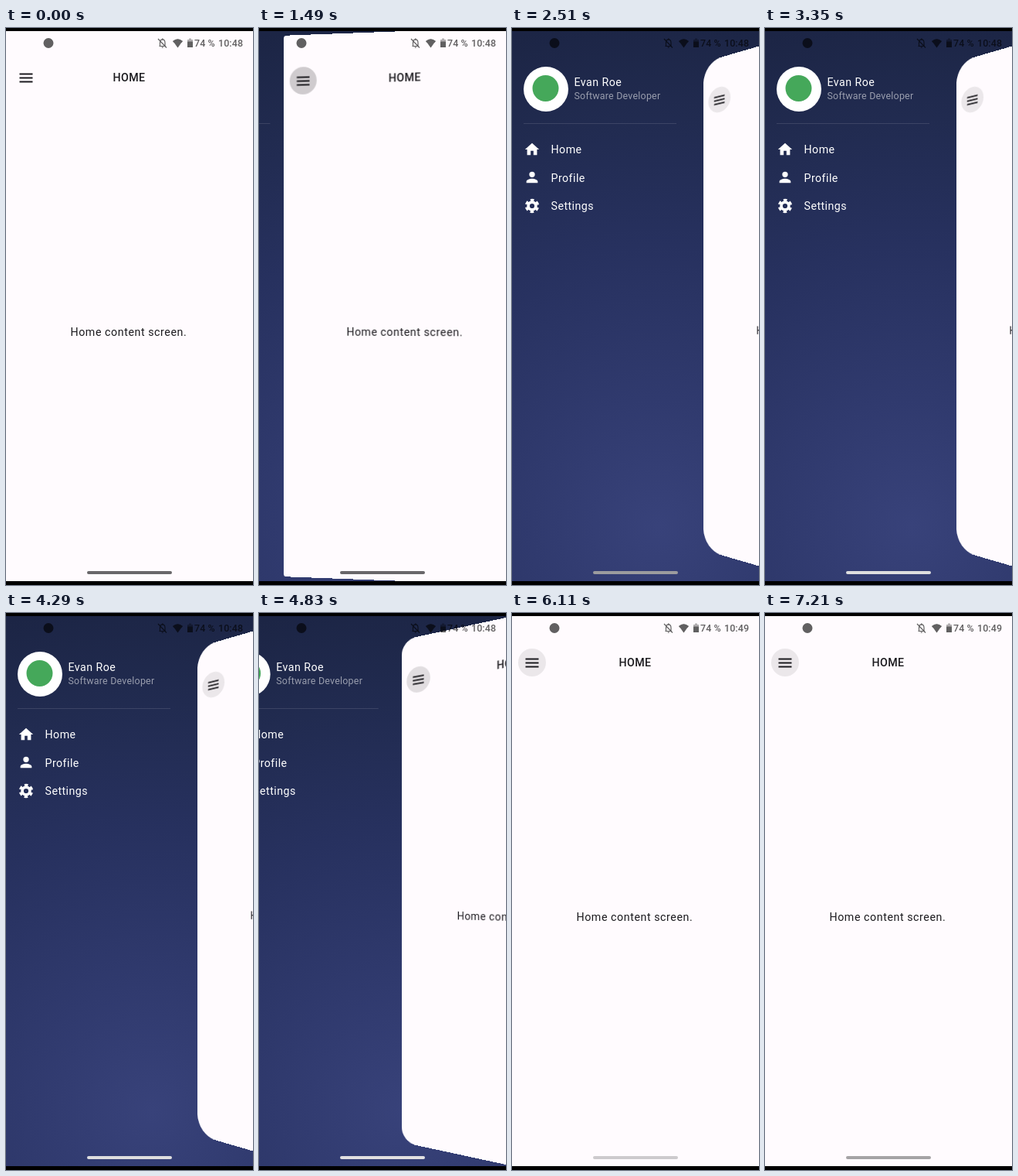
Recreate the animation shown at these times as an HTML page. Size 320x720 px, loop 7230 ms.

```html
<!DOCTYPE html>
<html lang="en">
<head>
<meta charset="utf-8">
<title>Sliding drawer</title>
<style>
  html, body { margin: 0; width: 320px; height: 720px; overflow: hidden; background: #000; }
  body { position: relative; font-family: Roboto, "Open Sans", sans-serif; --loop: 7230ms linear infinite; }
  svg, .screen, .menu, .page, .ripple, .pill { position: absolute; }
  text { white-space: pre; }

  .screen {
    left: 0; top: 4px; width: 320px; height: 711px; overflow: hidden;
    background: radial-gradient(circle 660px at 190px 640px, #38427a 0%, #303a6e 25%, #27315f 55%, #212b50 80%, #1c2545 100%);
  }
  .menu { inset: 0; animation: menu var(--loop); }
  .page {
    inset: 0; overflow: hidden; background: #fffbfe;
    animation: page var(--loop);
  }
  .menu svg, .page svg { left: 0; top: -4px; }
  .ripple {
    left: 8px; top: 42px; width: 36px; height: 36px; border-radius: 50%;
    animation: ripple var(--loop);
  }
  .status { left: 0; top: 0; }
  .before { animation: before var(--loop); }
  .after { animation: after var(--loop); }
  .pill {
    left: 105px; top: 702px; width: 110px; height: 4px; border-radius: 2px;
    animation: pill var(--loop);
  }

  .label { font-size: 14.22px; letter-spacing: .45px; }
  .role { font-size: 12.44px; letter-spacing: .22px; fill-opacity: .54; }
  .title { font-size: 14.22px; font-weight: 500; letter-spacing: .35px; }
  .body { font-size: 14.22px; letter-spacing: .56px; }
  .clock { font-size: 12.44px; font-weight: 500; letter-spacing: .1px; }

  /* Drawer opens 1352-1908 ms and closes 4586-5286 ms. */
  @keyframes menu {
    0%, 18.7% { transform: translateX(-228px); animation-timing-function: ease-in-out; }
    26.39%, 63.43% { transform: translateX(0); animation-timing-function: ease-in-out; }
    73.11%, 100% { transform: translateX(-228px); }
  }
  @keyframes page {
    0%, 18.7% {
      transform: translateX(0) perspective(260px) rotateY(0deg);
      border-radius: 0; animation-timing-function: ease-in-out;
    }
    26.39%, 63.43% {
      transform: translateX(227px) perspective(260px) rotateY(-12deg);
      border-radius: 30px; animation-timing-function: ease-in-out;
    }
    73.11%, 100% {
      transform: translateX(0) perspective(260px) rotateY(0deg);
      border-radius: 0;
    }
  }
  @keyframes ripple {
    0%, 16.6% { background: #cfcbce; opacity: 0; transform: scale(.3); }
    19.3% { opacity: 1; transform: none; }
    20.6% { background: #cfcbce; }
    24.5% { background: #d9d5d9; }
    31%, 61% { background: #ebe7ea; }
    63.5% { background: #d6d2d5; }
    70%, 100% { background: #ebe7ea; opacity: 1; transform: none; }
  }
  @keyframes pill {
    0%, 20.6% { background: #69676a; }
    24.5% { background: #33353d; }
    34.7% { background: #9c9c9e; }
    45%, 64% { background: #dededf; }
    72.3%, 78% { background: #e6e3e6; }
    95%, 100% { background: #a5a3a5; }
  }
  @keyframes before {
    0%, 67% { opacity: 1; }
    67.01%, 100% { opacity: 0; }
  }
  @keyframes after {
    0%, 67% { opacity: 0; }
    67.01%, 100% { opacity: 1; }
  }
</style>
</head>
<body>
<div class="screen">
  <div class="menu">
    <svg width="320" height="720" fill="#fff">
      <circle cx="44" cy="79" r="29"/>
      <circle cx="43.5" cy="78" r="17" fill="#45a85a"/>
      <text class="label" x="80.5" y="75">Evan Roe</text>
      <text class="role" x="80.5" y="92">Software Developer</text>
      <path d="M15 123.5H213" stroke="#fff" stroke-opacity=".12"/>

      <svg x="15" y="146" width="22" height="22" viewBox="0 0 24 24">
        <path d="M10 20v-6h4v6h5v-8h3L12 3 2 12h3v8z"/>
      </svg>
      <svg x="15" y="182" width="22" height="22" viewBox="0 0 24 24">
        <path d="M12 12a4 4 0 1 0 0-8 4 4 0 0 0 0 8zm0 2c-2.7 0-8 1.3-8 4v2h16v-2c0-2.7-5.3-4-8-4z"/>
      </svg>
      <svg x="15" y="219" width="22" height="22" viewBox="0 0 24 24" fill="none" stroke="#fff" stroke-width="4">
        <circle cx="12" cy="12" r="5.4"/>
        <circle cx="12" cy="12" r="8" stroke-dasharray="4.6 3.778" stroke-dashoffset="2.3" transform="rotate(30 12 12)"/>
      </svg>

      <text class="label" x="50.5" y="161.5">Home</text>
      <text class="label" x="50.5" y="198.5">Profile</text>
      <text class="label" x="50.5" y="235">Settings</text>
    </svg>
  </div>

  <div class="page">
    <div class="ripple"></div>
    <svg width="320" height="720" fill="#1c1b1f">
      <path d="M17.5 59.5h17M17.5 64.5h17M17.5 69.5h17" stroke="#1c1b1f" stroke-width="1.8"/>
      <text class="title" x="138.5" y="69">HOME</text>
      <text class="body" x="83.5" y="398">Home content screen.</text>
    </svg>
  </div>
</div>

<svg class="status" width="320" height="40" fill="#000" opacity=".62">
  <circle cx="55" cy="19.5" r="6.5"/>
  <path d="M198.5 23.5h8.5M199.5 23v-4c0-5.5 6.5-5.5 6.5 0v4M197 14l11 11.5" fill="none" stroke="#000" stroke-width="1.2"/>
  <path d="M201.5 24.5h2.5a1.25 1.25 0 0 1-2.5 0zM202 13.5h1.5v2h-1.5z"/>
  <path d="M216 17q6.5-5.5 13 0l-6.5 8.5z" opacity=".45"/>
  <path d="M216 17q6.5-5.5 13 0l-1.6 2.1h-9.8zM218 19h9l-4.5 6.5z"/>
  <path d="M237 13.5h3v1.5h2v10h-7V15h2z" opacity=".5"/>
  <path d="M235 17.5h7V25h-7z"/>
  <text class="clock" x="244" y="24">74 %</text>
  <text class="clock before" x="275" y="24">10:48</text>
  <text class="clock after" x="275" y="24">10:49</text>
</svg>
<div class="pill"></div>
</body>
</html>
```
